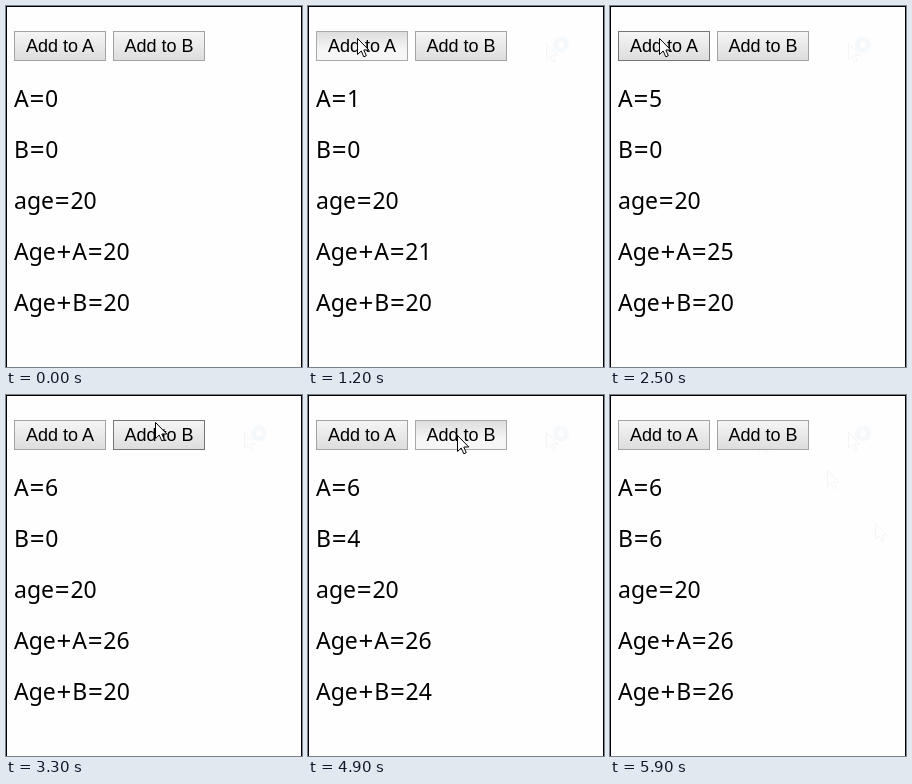
Animation, 296 px wide and 361 px high, one loop 6.3 s. Source, as an HTML page:

```html
<!DOCTYPE html>
<html lang="en">
<head>
<meta charset="utf-8">
<title>Counters</title>
<style>
  html, body { margin: 0; width: 100%; height: 100%; overflow: hidden; background: #fefefe; }
  #stage { position: absolute; left: 0; top: 0; width: 296px; height: 361px; overflow: hidden;
    box-sizing: border-box; border: 1px solid #000; border-bottom: 0; background: #fefefe; }
  #page { position: absolute; left: -1px; top: -1px; width: 296px; height: 361px; }
  .btn { position: absolute; top: 25px; width: 92px; height: 30px; box-sizing: border-box;
    border: 1px solid #a3a3a3; background: linear-gradient(#f5f5f5, #dddddd);
    font: 18px/28px "Liberation Sans", Arial, sans-serif; color: #000; text-align: center; white-space: nowrap; }
  .btn.hover { border-color: #757575; }
  .btn.down { border-color: #a9a9a9; background: linear-gradient(#dedede, #f6f6f6 65%); }
  .line { position: absolute; left: 8px; height: 30px; white-space: nowrap; color: #000;
    font: 23px/30px "Noto Sans", "Open Sans", sans-serif; }
  .op { position: relative; top: 1px; margin: 0 .75px; font-size: 26px; line-height: 1px; }
  svg { position: absolute; left: 0; top: 0; }
</style>
</head>
<body>
<div id="stage"><div id="page">
  <svg width="296" height="361">
    <defs>
      <path id="arrow" d="M.5 .5V16.5L4.2 13L6.8 18.8L9.3 17.7L6.8 12H11.8Z"
        fill="#fff" stroke="#000" stroke-linejoin="round"/>
      <circle id="ring" cx="15" cy="1.5" r="5.5" fill="none" stroke="#3f8fd0" stroke-width="5"/>
    </defs>
    <g id="trails" opacity=".035"></g>
  </svg>
  <div class="btn" id="btnA" style="left:8px">Add to A</div>
  <div class="btn" id="btnB" style="left:107px">Add to B</div>
  <div id="lines"></div>
  <svg width="296" height="361">
    <g id="cursor"><use href="#arrow"/><use id="busy" href="#ring"/></g>
  </svg>
</div></div>
<script>
const LOOP = 6300, STEP = 100, AGE = 20, ENTER = 100, LEAVE = 5900;

// time, x, y of the pointer; each place holds until the next
const moves = [
  [100, 238, 37], [200, 178, 36], [300, 104, 34], [400, 49, 32],
  [3000, 62, 31], [3100, 88, 29], [3200, 124, 27], [3300, 149, 27],
  [3400, 149, 34], [3500, 149, 40],
  [5600, 217, 75], [5700, 265, 128], [5800, 280, 135]
];
const presses = {
  A: [500, 1200, 1600, 2000, 2400, 2800],
  B: [3600, 3900, 4400, 4500, 4900, 5200]
};
// faint marks the pointer leaves behind: time, x, y, busy ring
const trails = [[200, 238, 37, true], [5600, 149, 40], [5700, 217, 75], [5800, 265, 128]];

const $ = id => document.getElementById(id);
const count = (list, t) => list.filter(p => t >= p + STEP).length;
const isDown = (list, t) => list.some(p => t >= p && t < p + STEP);

const marks = trails.map(([, x, y, busy]) => {
  const g = document.createElementNS("http://www.w3.org/2000/svg", "g");
  g.setAttribute("transform", `translate(${x} ${y})`);
  g.innerHTML = '<use href="#arrow"/>' + (busy ? '<use href="#ring"/>' : "");
  $("trails").append(g);
  return g;
});

const values = ["A=", "B=", "age=", "Age+A=", "Age+B="].map((label, i) => {
  const row = document.createElement("div");
  row.className = "line";
  row.style.top = 77 + 51 * i + "px";
  row.innerHTML = label.replace(/[+=]/g, '<span class="op">$&</span>') + "<span></span>";
  $("lines").append(row);
  return row.lastChild;
});

function setButton(name, left, x, y, t) {
  const over = x >= left && x < left + 92 && y >= 25 && y < 55;
  const list = $("btn" + name).classList;
  list.toggle("hover", over);
  list.toggle("down", over && isDown(presses[name], t));
}

function draw(t) {
  const a = count(presses.A, t), b = count(presses.B, t);
  [a, b, AGE, AGE + a, AGE + b].forEach((v, i) => values[i].textContent = v);

  const shown = t >= ENTER && t < LEAVE;
  const [, x, y] = shown ? moves.filter(m => t >= m[0]).pop() : [0, -50, -50];
  $("cursor").setAttribute("transform", `translate(${x} ${y})`);
  $("busy").style.display = t < 200 ? "" : "none";
  setButton("A", 8, x, y, t);
  setButton("B", 107, x, y, t);
  marks.forEach((m, i) => m.style.display = t >= trails[i][0] ? "" : "none");
}

function tick() {
  draw(performance.now() % LOOP);
  requestAnimationFrame(tick);
}
tick();
</script>
</body>
</html>
```
